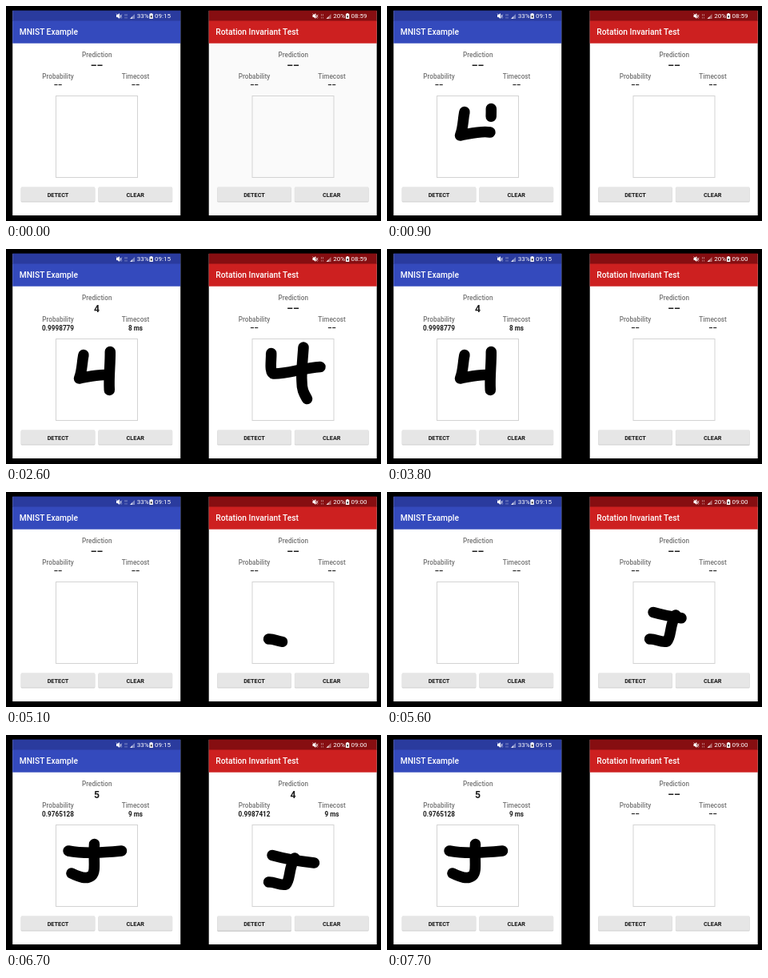
An HTML page that plays this animation: 469 px wide and 269 px high, repeating every 8 s.

```html
<!DOCTYPE html>
<html lang="en">
<head>
<meta charset="utf-8">
<title>Digit recognition on two phones</title>
<style>
  html, body { margin: 0; width: 100%; height: 100%; overflow: hidden; background: #000; }
  svg { display: block; width: 469px; height: 269px; font-family: Roboto, "Noto Sans", sans-serif; font-weight: 500; }
  .mid { text-anchor: middle; }
  .label { font-size: 8.2px; fill: #757575; }
  .value { font-size: 8.2px; fill: #1c1c1c; font-weight: 600; }
  .big { font-size: 12.2px; }
  .button { font-size: 7.3px; fill: #161616; font-weight: 600; }
  .status { font-size: 8px; fill: #fff; font-weight: 400; }
  .title { font-size: 10.25px; fill: #fff; }
  .ink { fill: none; stroke: #000; stroke-width: 13.5; stroke-linecap: round; stroke-linejoin: round; }
</style>
</head>
<body>
<svg id="stage" viewBox="0 0 469 269"></svg>
<script>
const LOOP = 8000, STEP = 100, EMPTY = "––";

// stroke: [start, end, cleared, path]; result: [from, to, digit, probability, cost]; press: [from, to]
const phones = [
  {
    x: 0, bar: "#2a3b9e", head: "#344abd", title: "MNIST Example", charge: "33%",
    strokes: [
      [350, 800, 3900, "M97 132.500C95 141 95.500 152 91.500 162C104 160 116 156 129 158"],
      [860, 1060, 3900, "M130.300 128.500C130.500 145 128.300 160 129.300 176.500"],
      [5750, 6000, LOOP, "M82 173C92 178 101 181 107 176C113 171 109 156 110.500 136.500"],
      [6000, 6200, LOOP, "M78 145C99 149 122 147 144.500 145"]
    ],
    results: [[1700, 3900, "4", "0.9998779", "8 ms"], [6500, LOOP, "5", "0.9765128", "9 ms"]],
    detect: [[1600, 1800], [6400, 6600]],
    clear: [[3900, 4000]]
  },
  {
    x: 245.5, bar: "#860e11", head: "#cd2020", title: "Rotation Invariant Test", charge: "20%",
    strokes: [
      [1850, 2200, 3700, "M331.700 130.500C332 139 329 155 335 156C351 156.500 371 149 393 147.500"],
      [2350, 2600, 3700, "M372 123C371 139 369 154 370 166C370 177 373 181 376.500 187.500"],
      [5000, 5330, 6900, "M328.500 184C335 183 343 189 350 187C356 181 353 167 361 154"],
      [5400, 5700, 6900, "M333 150.500C349 155 367 158 385.500 160"]
    ],
    results: [[2800, 3700, "4", "0.9991237", "9 ms"], [6700, 6900, "4", "0.9987412", "9 ms"]],
    detect: [[2700, 2900], [6600, 6800]],
    clear: [[3700, 3900], [6900, 7000]]
  }
];

const text = (cls, x, y, s, id = "") => `<text class="${cls}" x="${x}" y="${y}" data-id="${id}">${s}</text>`;
const rect = (x, y, w, h, fill, more = "") => `<rect x="${x}" y="${y}" width="${w}" height="${h}" fill="${fill}" ${more}/>`;

const button = (x, s, id) =>
  rect(x - .2, 227, 92.8, 18.5, "#cfcfcf", `rx="1.5" data-id="${id}"`) +
  rect(x, 226.3, 92.4, 18.1, "#e6e6e6", 'rx="1.2"') +
  text("button mid", x + 46.2, 238.7, s);

const icons = `<g fill="#fff">
  <path d="M138 11h1.500l2.300-2v7l-2.300-2h-1.500z"/>
  <path d="M142.300 10.800l2.500 3.500m0-3.500l-2.500 3.500M138 9.500l6 6" stroke="#fff" stroke-width=".7" fill="none"/>
  <path d="M149 10v2.500m2-2.500v2.500M149 14v1.500m2-1.500v1.500" stroke="#fff" stroke-width=".7" stroke-opacity=".6"/>
  <path d="M155 16h6v-6z" fill-opacity=".4"/><path d="M155 16h3v-3z" fill-opacity=".7"/>
  <path d="M180.700 9h1.800v.8h1.300v6.200h-4.400v-6.200h1.300z"/>
  <path d="M180.900 12h1.500v2.500h-1.500z" fill="#222"/></g>`;

const draw = p => `<g transform="translate(${p.x})">
  ${rect(8.2, 6, 210, 256, "#fff", 'data-id="page"')}
  ${rect(8.2, 5.6, 210, 13.4, p.bar)}${rect(8.2, 18.5, 210, 28.2, p.head)}${icons}
  ${text("status", 163.7, 15.4, p.charge)}${text("status", 186, 15.4, "09:15", "clock")}
  ${text("title", 16.8, 36.2, p.title)}
  ${text("label mid", 113.7, 63.7, "Prediction")}${text("value big mid", 113.5, 79.2, EMPTY, "digit")}
  ${text("label mid", 65, 91.1, "Probability")}${text("value mid", 65, 102.2, EMPTY, "chance")}
  ${text("label mid", 162, 91.1, "Timecost")}${text("value mid", 162, 102.2, EMPTY, "cost")}
  ${rect(62.5, 112.5, 102, 102, "none", 'stroke="#d3d3d3"')}
  ${button(18.8, "DETECT", "detect")}${button(115.6, "CLEAR", "clear")}</g>
  ${p.strokes.map(s => `<path class="ink" pathLength="1" d="${s[3]}"/>`).join("")}`;

const stage = document.getElementById("stage");
stage.innerHTML = phones.map(p => `<g>${draw(p)}</g>`).join("");
phones.forEach((p, i) => {
  const group = stage.children[i];
  p.el = {};
  group.querySelectorAll("[data-id]").forEach(e => p.el[e.dataset.id] = e);
  p.ink = group.querySelectorAll(".ink");
});

const within = (t, [from, to]) => t >= from && t < to;

function render(t) {
  for (const p of phones) {
    p.strokes.forEach(([start, end, cleared], i) => {
      const shown = t > start && t < cleared;
      p.ink[i].style.display = shown ? "" : "none";
      if (shown) p.ink[i].setAttribute("stroke-dasharray", `${Math.min(1.01, (t - start) / (end - start) * 1.01)} 3`);
    });
    const [, , ...values] = p.results.find(r => within(t, r)) || [0, 0, EMPTY, EMPTY, EMPTY];
    ["digit", "chance", "cost"].forEach((id, i) => p.el[id].textContent = values[i]);
    // A pressed button casts a slightly deeper shadow.
    for (const id of ["detect", "clear"])
      p.el[id].setAttribute("height", p[id].some(r => within(t, r)) ? 19 : 18.5);
  }
  const right = phones[1].el;
  right.clock.textContent = t < 3700 ? "08:59" : "09:00";
  right.page.setAttribute("fill", t < 400 ? "#fafafa" : "#fff");
}

const begin = performance.now();
function tick() {
  const t = (performance.now() - begin) % LOOP;
  render(Math.floor(t / STEP) * STEP);
  requestAnimationFrame(tick);
}
tick();
</script>
</body>
</html>
```
